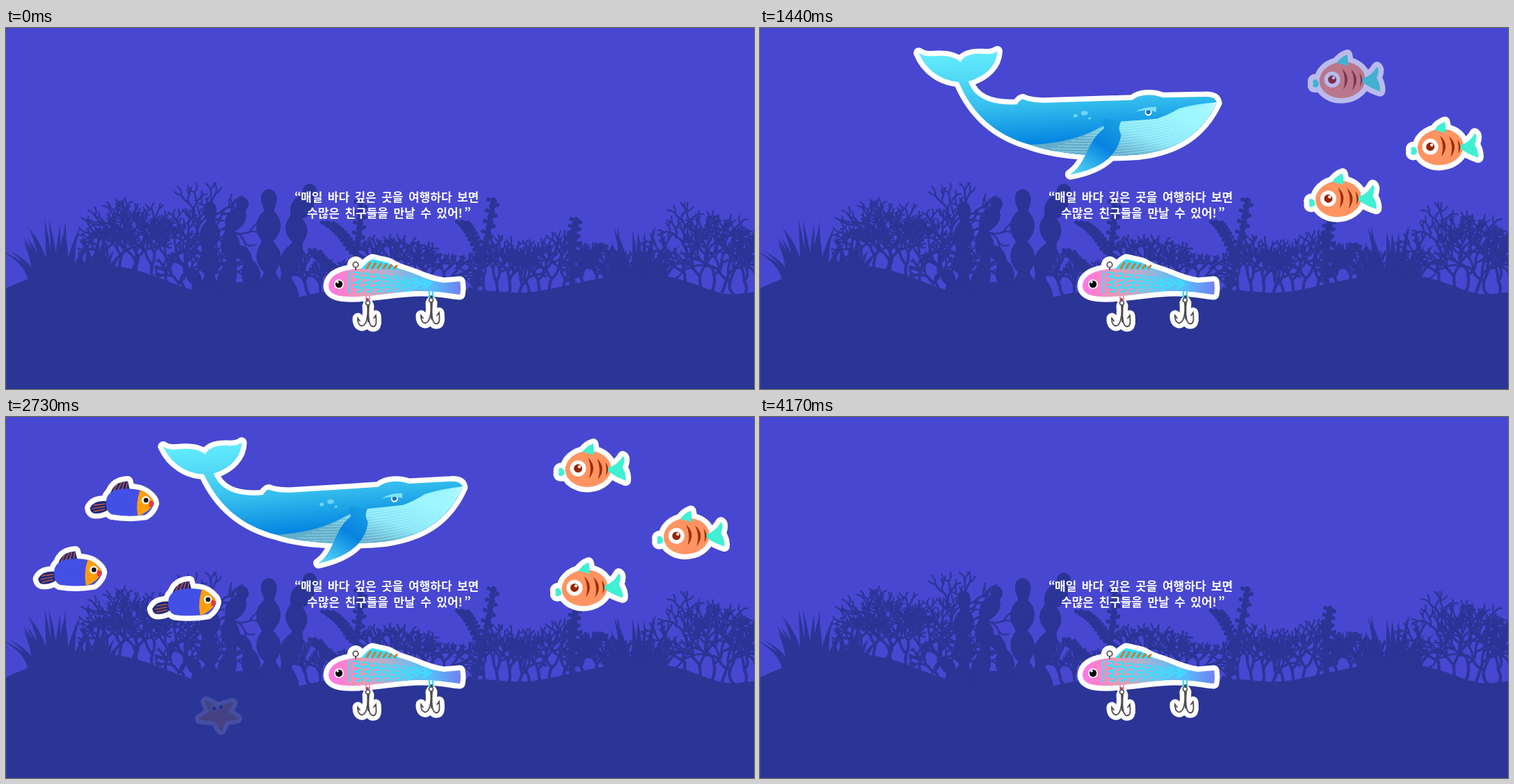
These frames come from a looping animation (1076x520 px, 4.2 s). An HTML page:

```html
<!DOCTYPE html>
<html lang="ko">
<meta charset="utf-8">
<style>
html, body { margin: 0; height: 100%; overflow: hidden; background: #4847d1 }
svg { display: block; width: 100vw; height: 100vh }
text { font: 700 17px "Noto Sans CJK KR", "Noto Sans CJK", sans-serif; word-spacing: 2.7px; fill: #fff }
</style>
<svg viewBox="0 0 1076 520">
  <defs>
    <linearGradient id="skin" gradientUnits="userSpaceOnUse" x1="0" y1="25" x2="0" y2="165">
      <stop stop-color="#64edff"/><stop offset=".3" stop-color="#50d8f4"/>
      <stop offset=".58" stop-color="#36bfee"/><stop offset="1" stop-color="#0284e0"/>
    </linearGradient>
    <linearGradient id="belly" gradientUnits="userSpaceOnUse" x1="560" y1="120" x2="530" y2="190">
      <stop stop-color="#94f5ff"/><stop offset=".55" stop-color="#86e6f6"/><stop offset="1" stop-color="#62aecb"/>
    </linearGradient>
    <linearGradient id="flipper" gradientUnits="userSpaceOnUse" x1="505" y1="135" x2="445" y2="212">
      <stop stop-color="#189ce2"/><stop offset=".4" stop-color="#0783e0"/><stop offset="1" stop-color="#58dcf6"/>
    </linearGradient>
    <linearGradient id="lureSkin" gradientUnits="userSpaceOnUse" x1="464" y1="0" x2="654" y2="0">
      <stop stop-color="#ff78e6"/><stop offset=".12" stop-color="#fb82cc"/><stop offset=".24" stop-color="#e99ab2"/>
      <stop offset=".45" stop-color="#b0b0d0"/><stop offset=".68" stop-color="#62bdf2"/>
      <stop offset=".78" stop-color="#58bdfa"/><stop offset="1" stop-color="#7180f0"/>
    </linearGradient>
    <clipPath id="jaw"><path id="jawShape" d="M385 165Q440 166 478 150Q500 140 518 139L570 138Q590 132 602 125Q630 119 657 119C635 160 600 185 540 188C480 189 420 180 385 165Z"/></clipPath>
  </defs>
  <g id="sea" fill="#2b3596" stroke="#2b3596" stroke-linecap="round">
    <path d="M1 520V375C30 362 70 344 135 342C200 343 235 372 282 381C320 362 370 358 412 390C440 384 460 378 500 376L660 378C700 377 725 384 755 381C810 374 850 356 915 355C985 356 1010 386 1050 384L1077 381V520Z"/>
  </g>
  <g id="lure"></g>
  <text y="250"><tspan x="415">“</tspan><tspan x="424">매일 바다 깊은 곳을 여행하다 보면</tspan></text>
  <text y="273"><tspan x="433">수많은 친구들을 만날 수 있어!</tspan><tspan x="659">”</tspan></text>
  <g id="friends"></g>
</svg>
<script>
const $ = id => document.getElementById(id);
const range = n => [...Array(n).keys()];
const path = (d, fill, extra = '') => `<path d="${d}" fill="${fill}" ${extra}/>`;
const dot = (x, y, r, fill = '#fff') => `<circle cx="${x}" cy="${y}" r="${r}" fill="${fill}"/>`;
const line = (d, color, w) => path(d, 'none', `stroke="${color}" stroke-width="${w}" stroke-linecap="round"`);
// White die-cut border behind the silhouette, details on top
const sticker = (shape, detail) =>
  `<g stroke="#fff" stroke-width="15" stroke-linejoin="round" stroke-linecap="round">${shape}</g>${shape}${detail}`;

// ---- sea bed plants ----
const weed = '#2b3596';
let seed = 11, plants = '';
const rnd = () => (seed = seed * 16807 % 2147483647) / 2147483647;

// Forked coral: the lean drifts back upwards with every fork
function twig(x, y, a, l, w, n) {
  const X = x + l * Math.cos(a), Y = y + l * Math.sin(a), k = (rnd() - .5) * l * .7;
  const [mx, my] = [(x + X) / 2 - k * Math.sin(a), (y + Y) / 2 + k * Math.cos(a)];
  plants += line(`M${x.toFixed(1)} ${y.toFixed(1)}Q${mx.toFixed(1)} ${my.toFixed(1)} ${X.toFixed(1)} ${Y.toFixed(1)}`, weed, w.toFixed(1));
  if (n) for (const s of [-1, 1])
    twig(X, Y, (a + s * (.15 + .6 * rnd())) * .95 - .0785, l * (.68 + .3 * rnd()), w * .9, n - 1);
}
const coral = (x, y, width, l, stems, n = 5) => {
  for (const i of range(stems)) {
    const u = (i + .5) / stems * 2 - 1;
    twig(x + u * width / 2, y, -1.57 + u * .45, l * (.8 + .3 * rnd()), 4.2, n);
  }
};
function grass(x, y, spread, height, n) {
  for (const i of range(n)) {
    const u = i / (n - 1) * 2 - 1, bx = x + u * spread * .5;
    const tx = x + u * spread + (rnd() - .5) * 24, ty = y - height * (1 - .5 * u * u) * (.6 + .4 * rnd());
    const mx = bx + u * 4, my = y + (ty - y) * .4;
    plants += path(`M${bx - 5} ${y + 14}Q${mx - 4} ${my} ${tx} ${ty}Q${mx + 5} ${my} ${bx + 5} ${y + 14}Z`, weed, 'stroke="none"');
  }
}
function trail([x0, y0, cx, cy, x1, y1], n, draw) {
  for (const i of range(n + 1)) {
    const t = i / n, s = 1 - t;
    draw(s * s * x0 + 2 * s * t * cx + t * t * x1, s * s * y0 + 2 * s * t * cy + t * t * y1, t, i);
  }
}
const kelp = (curve, w, waves, sway) => trail(curve, 60, (x, y, t) => {
  const p = t * waves * 2 * Math.PI, r = w * (.74 + .26 * Math.cos(p)) * (.62 + .38 * Math.min(1, t * 4));
  plants += dot((x + sway * Math.sin(p * .5)).toFixed(1), y.toFixed(1), r.toFixed(1), weed);
});
const knobs = (...curve) => trail(curve, 18, (x, y, t, i) => {
  plants += dot(x, y, 4.5, weed) + dot(x + (i % 2 ? 7 : -7), y - 2, 2.6, weed);
});

grass(72, 352, 70, 84, 20);
grass(130, 348, 32, 62, 8);
grass(905, 362, 72, 88, 21);
grass(535, 380, 18, 86, 6);
coral(222, 368, 70, 28, 4, 6);
coral(165, 350, 50, 19, 3);
coral(270, 382, 40, 19, 3);
coral(452, 384, 50, 13, 3);
coral(590, 382, 80, 20, 5);
coral(715, 384, 60, 17, 4);
coral(775, 382, 60, 24, 4);
coral(850, 370, 60, 14, 3);
coral(1008, 380, 60, 26, 4, 6);
coral(1062, 386, 40, 23, 3);
kelp([293, 259, 294, 320, 291, 385], 14, 3.2, 1);
kelp([340, 252, 322, 280, 316, 385], 13, 3.4, 4);
kelp([378, 243, 376, 310, 380, 385], 17, 3.2, 1);
kelp([437, 234, 414, 270, 406, 385], 15, 4, 5);
kelp([338, 322, 352, 340, 356, 378], 13, 1.5, 2);
kelp([268, 355, 275, 365, 280, 380], 12, 1, 0);
knobs(488, 380, 510, 320, 510, 252);
knobs(498, 320, 482, 292, 462, 282);
knobs(484, 352, 458, 345, 444, 322);
knobs(674, 378, 690, 320, 701, 249);
knobs(684, 330, 668, 290, 656, 281);
knobs(815, 378, 812, 320, 820, 277);
knobs(816, 354, 842, 340, 856, 314);
$('sea').innerHTML += plants;

// ---- lure ----
const hook = 'M521 398V423M520 400C523 436 505 434 506 418l3 4M522 400C520 424 524 430 528 430C533 430 533 424 532 414l-3 4';
const secondHook = h => h + `<g transform="translate(91 -4)">${h}</g>`;
const lureBody = 'M464 372C465 352 490 347 518 346L567 347C595 355 605 364 630 367L653 365Q655 375 653 384C640 383 625 379 600 379C570 378 545 385 505 387C478 388 465 384 464 372Z';
const fin = 'M511 347Q520 336 527 333L549 338L568 348Z';
const scales = range(4).map(r => range(8 - (r === 3) * 2).map(c => {
  const x = 500 + c * 14 + r % 2 * 4, y = 352 + r * 7.5 + c * (1.6 - r * .65);
  return `M${x} ${y}q7 -1 9 2q-1 3 -8 4`;
}).join('')).join('');
const stripes = range(6).map(i => `M${519 + i * 8} 346l${5 - i * .4} ${-8 + i * .9}`).join('');
$('lure').innerHTML = sticker(
  path(lureBody, 'url(#lureSkin)') + path(fin, '#2fdcff') + dot(503, 341, 4.5) + secondHook(path(hook, '#fff')),
  line('M494 351V381', '#3fdcfb', 2.5) + line(scales, '#3fdcfb', 2.6) + line(stripes, '#e2702a', 3) +
  `<circle cx="503" cy="341" r="3.8" fill="#fff" stroke="#555" stroke-width="1.8"/>` + line('M503 345V348', '#555', 2) +
  dot(479, 369, 7) + dot(479, 369, 5.2, '#000') + dot(477, 366, 1.8) +
  line('M518 384V392M523 384V392', '#f094bc', 2) + line('M609 380V388M614 380V388', '#40d8ff', 2.4) +
  secondHook(line(hook, '#4c4c50', 1.8) + `<circle cx="520.5" cy="396" r="3" fill="#fff" stroke="#4c4c50" stroke-width="1.6"/>`) +
  dot(520, 391, 2, '#a03c50') + dot(612, 387, 2, '#345'));

// ---- whale ----
const whaleBody = 'M233 24C246 35 262 25 282 34Q290 37 292 41Q295 35 303 32C320 26 333 36 346 28C344 48 328 63 302 69C308 92 330 106 370 106Q375 99 379 99Q387 104 410 106L536 109Q545 103 557 103Q570 103 580 108L640 110Q656 110 657 120C635 160 600 185 540 188C480 189 420 180 385 165C335 148 304 114 288 69C264 66 242 50 233 24Z';
const flipper = 'M493 148V133L518 139Q512 148 517 158C513 180 495 204 441 211C467 196 466 165 493 148Z';
const pleats = range(13).map(i => `M657 119C620 ${126 + i * 4.8} 560 ${138 + i * 4.8} ${515 - i * 10} ${140 + i * 3.2}`).join('');
const whale = `<g transform="translate(-442 -113)">${sticker(
  path(whaleBody, 'url(#skin)') + path(flipper, 'url(#flipper)'),
  `<use href="#jawShape" fill="url(#belly)"/><g clip-path="url(#jaw)">` +
  path(pleats, 'none', 'stroke="#d8fcff" stroke-width=".9" stroke-dasharray="3 1" opacity=".65"') + '</g>' +
  path(flipper, 'url(#flipper)') +
  [[466, 124, 5, 3.4], [453, 127, 3.2, 2.4], [473, 132, 2.2, 1.6]].map(([x, y, rx, ry]) =>
    `<ellipse cx="${x}" cy="${y}" rx="${rx}" ry="${ry}" fill="#6fd3f3"/>`).join('') +
  dot(558, 128, 5) + dot(558, 127.5, 3.2, '#1d6fae') +
  path('M540 126Q552 119 570 121L569 128Q558 123 540 126Z', '#7ce2f6'))}</g>`;

// ---- small friends ----
const teal = '#40f0d2', heart = 'c-4 -6 -10 -2 -7 3c-3 6 4 8 8 2z';
const stripe = 'q15 14 2 30q5 -15 -2 -30z';
const orangeFish = sticker(
  `<ellipse cx="-5" cy="5" rx="33" ry="26" transform="rotate(-6)" fill="#ff9462"/>` +
  path('M-13 -19Q-7 -28 2 -31Q4 -24 3 -15Z', teal) +
  path('M24 3Q38 -1 45 -14Q50 -11 45 2Q51 12 50 21Q37 17 24 8Z', teal) +
  path('M-39 8' + heart, teal),
  path(`M-5 -11${stripe}M8 -10${stripe}`, '#a02c04') + path('M20 -5q8 9 1 20q2 -10 -1 -20z', '#a02c04') +
  dot(-19, 5, 11.5) + dot(-19, 5, 6, '#962500') + dot(-17, 2.5, 2.2));

const navy = '#1e2a78';
const blueFish = sticker(
  path('M-17 -7Q-12 -24 8 -25L11 -12Z', navy) +
  path('M-21 4Q-40 2 -46 14Q-45 22 -38 22Q-28 22 -21 17Z', navy) +
  path('M-23 5Q-22 -12 0 -14Q24 -16 35 -8Q46 0 46 6Q44 16 34 23Q10 27 -15 23Q-24 18 -23 5Z', '#4350e6'),
  path('M26 -13Q38 -9 46 4Q43 17 23 25Q19 6 26 -13Z', '#ff9d0c') +
  line('M-12 -11l5 -10M-6 -13l5 -10M0 -14l3 -10M6 -15l1 -8M-25 8l-15 2M-25 12l-17 3M-25 16l-15 3', '#d65a3c', 1.3) +
  dot(34, 2, 5.8) + dot(34.5, 2, 3.4, '#111') + path('M46 5' + heart, '#e0393f', 'transform="translate(9 1) scale(.78)"'));

const starShape = 'M3 21L-5 8L-27 5L-12 -4L-18 -20L-1 -11L20 -17L12 -4L26 5L9 8Z';
const star = sticker(path(starShape, '#ff9d0c'),
  path(starShape, '#ff9d0c', 'stroke="#ff9d0c" stroke-width="3" stroke-linejoin="round"') +
  dot(-7, -10, 4.8) + dot(3, -12, 4.8) + dot(-6.5, -9.5, 3, '#111') + dot(3.5, -11.5, 3, '#111'));

// art, x, y, fade-in start, swing angle, swing shift, rest angle, mirror
const cast = [
  [whale, 442, 113, 310, 4.8, 0, -.73],
  [orangeFish, 836, 240.5, 875, 1.5, -.8],
  [orangeFish, 983, 166, 1054, .6, -.4],
  [orangeFish, 842.5, 69.5, 1234, -1.5, .6],
  [blueFish, 167.5, 117.5, 1830, -.8, .6],
  [blueFish, 92, 218.5, 1950, .6, 0],
  [blueFish, 255.5, 261.5, 2062, 1, -.8],
  [star, 306, 429.5, 2690, .8, 0],
  [star, 798, 405.5, 2870, -.8, 0, 12],
  [star, 917.5, 447.5, 3050, .8, 0, 0, -1]
];
$('friends').innerHTML = cast.map(([art]) => `<g>${art}</g>`).join('');
const actors = [...$('friends').children];

const LOOP = 4200, FADE = 330, END = 4170, OUT = 300, SWING = 600;
const clamp = v => Math.max(0, Math.min(1, v));
function frame(now) {
  const t = Math.floor(now % LOOP / 30) * 30;
  const phase = ((t - 13 + SWING) % SWING) / SWING;
  const swing = Math.abs(phase * 4 - 2) - 1;
  cast.forEach(([, x, y, start, turn, shift, rest = 0, mirror = 1], i) => {
    actors[i].setAttribute('opacity', Math.min(clamp((t - start) / FADE), clamp((END - t) / OUT)));
    actors[i].setAttribute('transform',
      `translate(${x + shift * swing} ${y}) rotate(${rest + turn * swing}) scale(${mirror} 1)`);
  });
  requestAnimationFrame(frame);
}
frame(0);
</script>
</html>
```
